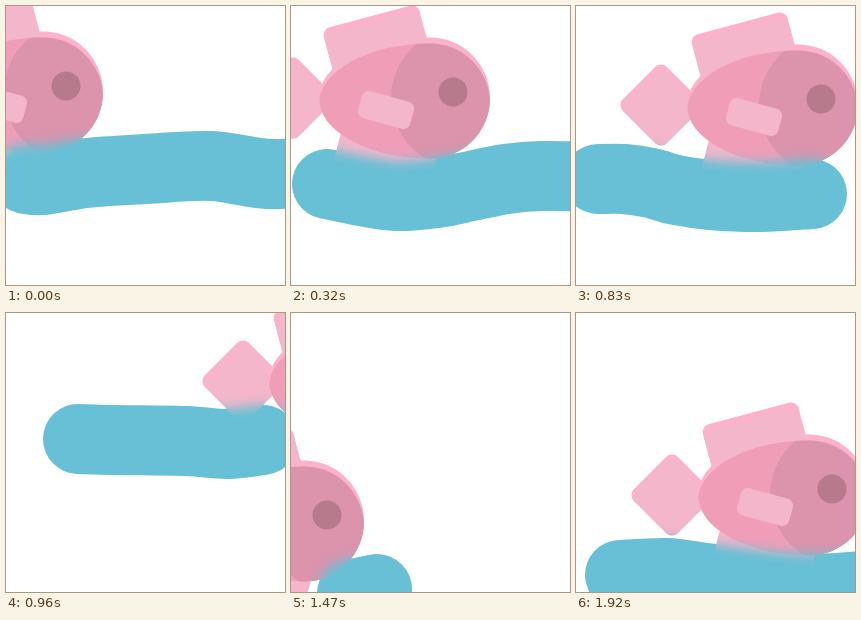
Write an HTML page with a canvas that moves like this. It is 279 px wide and 279 px high and loops after 2.24 s.

```html
<!DOCTYPE html>
<html lang="en">
<head>
<meta charset="utf-8">
<title>Fish on a wave</title>
<style>
html, body { margin: 0; width: 100%; height: 100%; overflow: hidden; background: #fff; }
canvas { display: block; }
</style>
</head>
<body>
<canvas id="stage" width="279" height="279"></canvas>
<script>
const SIZE = 279, STEP = 320;
const RIM = '#fdb1ca', FIN = '#f4b6ca', BODY = '#f09eb8', HEAD = '#dc93ac', EYE = '#b77a8d', WATER = '#67c0d5';

// Each pose: the eye's position and the centre line of the water.
const poses = [
  { eye: [60, 80], wave: [20, 173, 38, 174, 80, 167, 140, 163, 205, 160, 262, 168, 310, 165] },
  { eye: [162, 86], wave: [36, 178, 70, 185, 105, 190, 145, 187, 180, 180, 215, 173, 250, 170, 310, 171] },
  { eye: [245, 93], wave: [22, 173, 48, 173, 75, 177, 100, 184, 135, 189, 185, 191, 236, 188] },
  { eye: [397, 62], wave: [72, 126, 110, 127, 180, 128, 222, 131, 257, 127] },
  { eye: [36, 202], wave: [86, 276, 61, 281] },
  { eye: [197, 184], wave: [22, 275, 80, 273, 130, 276, 190, 282, 225, 277, 262, 271, 310, 276] },
  { eye: [256, 176], wave: [44, 262, 90, 260, 130, 265, 190, 273, 240, 276, 310, 271] }
];

const ctx = document.getElementById('stage').getContext('2d');
const layer = document.createElement('canvas');
layer.width = layer.height = SIZE;
const fish = layer.getContext('2d');

// Rounded box centred on x, y and turned by some degrees.
function box(x, y, w, h, r, turn) {
  const flat = new Path2D(), path = new Path2D();
  flat.roundRect(-w / 2, -h / 2, w, h, r);
  path.addPath(flat, new DOMMatrix().translate(x, y).rotate(turn));
  return path;
}

function disc(x, y, r) {
  const path = new Path2D();
  path.arc(x, y, r, 0, 2 * Math.PI);
  return path;
}

// Origin: the left end of the body, at mid height.
const tail = box(-26, 0, 62, 62, 8, 45);
const dorsal = box(58.5, -52.5, 99, 60, 8, -15);
const ventral = box(68.5, 52.5, 99, 60, 8, 15);
const sideFin = box(67, 12, 54, 28, 7, 15);
const body = new Path2D();
body.ellipse(111, 0, 60, 60.5, 0, -Math.PI / 2, Math.PI / 2);
body.ellipse(111, 0, 111, 60.5, 0, Math.PI / 2, Math.PI * 1.5);

function fill(path, color) {
  fish.fillStyle = color;
  fish.fill(path);
}

// Fills a shape again, a little lower, so that its top edge stays light.
function fillBelowRim(path, color, drop) {
  fish.save();
  fish.clip(path);
  fish.translate(0, drop);
  fill(path, color);
  fish.restore();
}

function drawFish([eyeX, eyeY]) {
  fish.clearRect(0, 0, SIZE, SIZE);
  fish.save();
  fish.translate(eyeX - 134, eyeY + 6);
  fill(ventral, FIN);
  fill(tail, RIM);
  fillBelowRim(tail, FIN, 5);
  fill(body, RIM);
  fill(dorsal, RIM);
  fillBelowRim(dorsal, FIN, 6);
  fillBelowRim(body, BODY, 6);
  fish.save();
  fish.clip(body);
  fish.translate(0, 6);
  fish.clip(body);
  fill(disc(142, -6, 70), HEAD);
  fish.restore();
  fill(sideFin, FIN);
  fill(disc(134, -6, 14.5), EYE);
  fish.restore();
}

function drawWater(c, p) {
  const last = p.length - 2;
  c.beginPath();
  c.moveTo(p[0], p[1]);
  for (let i = 0; i < last; i += 2) {
    const a = Math.max(i - 2, 0), b = i + 2, d = Math.min(i + 4, last);
    c.bezierCurveTo(
      p[i] + (p[b] - p[a]) / 6, p[i + 1] + (p[b + 1] - p[a + 1]) / 6,
      p[b] - (p[d] - p[i]) / 6, p[b + 1] - (p[d + 1] - p[i + 1]) / 6,
      p[b], p[b + 1]);
  }
  c.lineWidth = 70;
  c.lineCap = c.lineJoin = 'round';
  c.strokeStyle = WATER;
  c.stroke();
}

function draw({ eye, wave }) {
  ctx.fillStyle = '#fff';
  ctx.fillRect(0, 0, SIZE, SIZE);
  drawWater(ctx, wave);
  drawFish(eye);
  // The water swallows the fish with a soft edge.
  fish.save();
  fish.globalCompositeOperation = 'source-atop';
  fish.filter = 'blur(6px)';
  drawWater(fish, wave);
  fish.restore();
  ctx.drawImage(layer, 0, 0);
}

const start = performance.now();
function tick() {
  const time = performance.now() - start;
  draw(poses[Math.floor(time / STEP) % poses.length]);
  requestAnimationFrame(tick);
}
tick();
</script>
</body>
</html>
```
